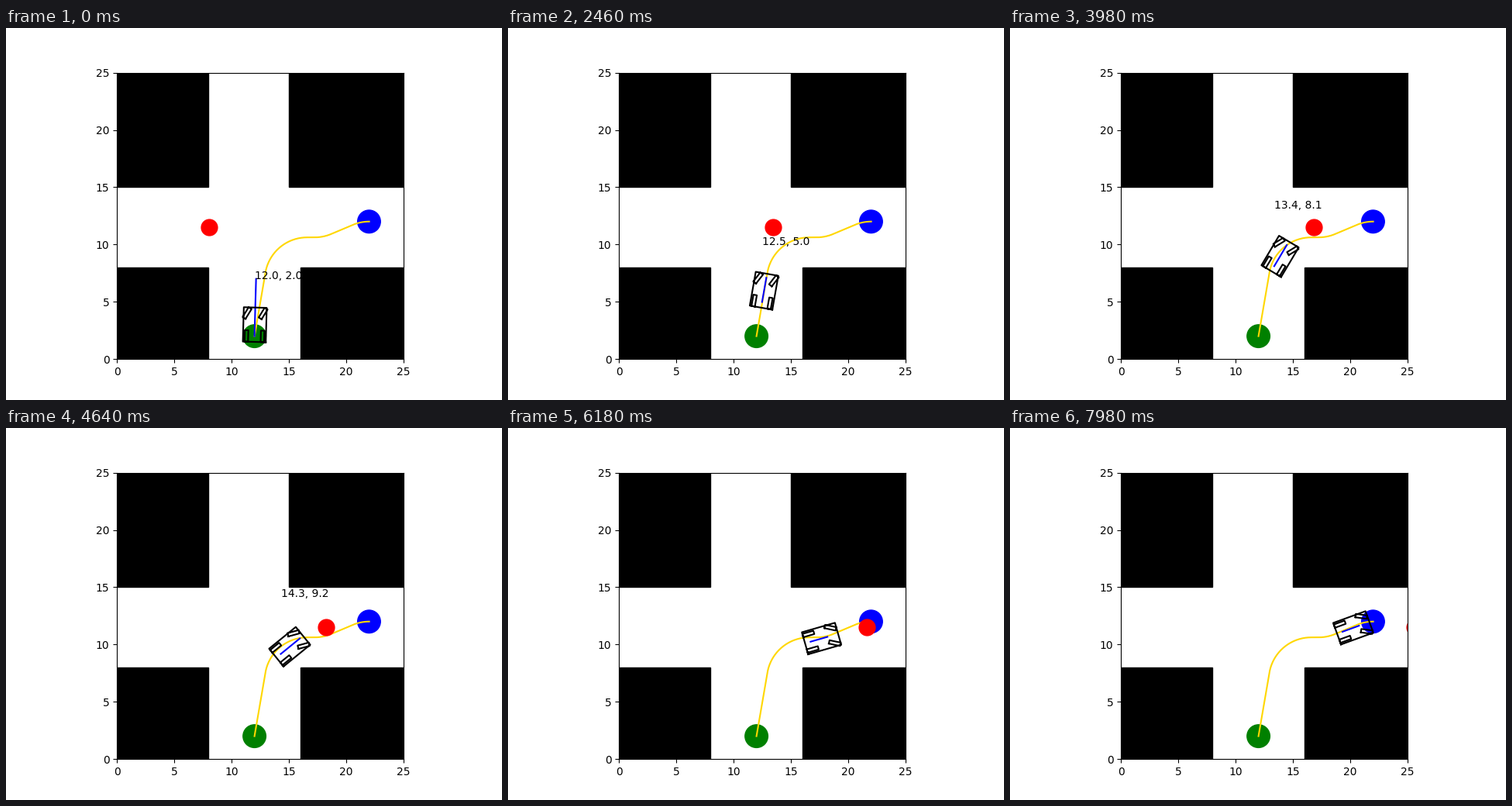
Write a matplotlib script that moves like this. It is 640 px wide and 480 px high and loops after 8000 ms.

```python
import numpy as np
import matplotlib.pyplot as plt
from matplotlib.animation import FuncAnimation
from matplotlib.patches import Circle, Rectangle

FRAMES, DT = 400, 0.02
START, GOAL = np.array([12, 2]), (22, 12)
WHEELBASE, TREAD, BACK = 2.0, 0.7, 0.5
BODY_LEN, BODY_WID = 3.0, 2.0
WHEEL_LEN, WHEEL_WID = 1.0, 0.3
LOCK, CHATTER = 30, 28          # steering limits, degrees
ACCEL, CRUISE, SLOW = 1.02, 2.15, 1.53
TARGET_SPEED = 5
RADIUS = 3.7                    # of every bend in the route


def ease(t, start, end):
    u = np.clip((t - start) / (end - start), 0, 1)
    return u * u * (3 - 2 * u)


def integrate(rate, dx):
    """Running trapezoid sum, starting at zero."""
    return np.r_[0, np.cumsum((rate[1:] + rate[:-1]) / 2 * dx)]


def straight(length):
    return length, 0


def bend(degrees):
    return RADIUS * np.radians(abs(degrees)), degrees


def trace(start, heading, legs, n=60):
    """Points along a chain of straights and bends."""
    points = [np.array([start])]
    for length, change in legs:
        yaw = np.radians(heading + change * np.linspace(0, 1, n))
        ds = length / (n - 1)
        leg = np.column_stack([integrate(np.cos(yaw), ds), integrate(np.sin(yaw), ds)])
        points.append(points[-1][-1] + leg[1:])
        heading += change
    return np.vstack(points)


def box(x0, x1, y0, y1):
    return np.array([[x0, y0], [x1, y0], [x1, y1], [x0, y1], [x0, y0]])


def turn(points, angle):
    c, s = np.cos(angle), np.sin(angle)
    return points @ np.array([[c, s], [-s, c]])


route = trace(START, 80.25, [straight(5.63), bend(-80.25), straight(0.65),
                             bend(23), straight(2.03), bend(-23)])

# speed up, cruise, slow down after the corner
t = np.arange(FRAMES) * DT
speed = np.minimum(ACCEL * t, CRUISE - (CRUISE - SLOW) * ease(t, 4.6, 5.7))
driven = integrate(speed, DT)

# full lock onto the first straight, then the corner and a slight left
lock_rate = np.degrees(np.tan(np.radians(LOCK)) / WHEELBASE)
heading = np.maximum(80, 88.4 - lock_rate * driven)
heading += -64 * ease(t, 2.8, 5.9) + 4 * ease(t, 6.2, 7.6)
yaw = np.radians(heading)
direction = np.column_stack([np.cos(yaw), np.sin(yaw)])
position = START + np.column_stack(
    [integrate(speed * direction[:, j], DT) for j in (0, 1)])

# steering flips between two values that average to the needed angle
need = np.degrees(np.arctan(WHEELBASE * np.gradient(yaw, driven)))
flip = np.arange(FRAMES) % 2 == 1
steer = np.radians(np.where(flip, -CHATTER, np.clip(2 * need + CHATTER, -LOCK, LOCK)))

reach = np.where(ACCEL * t < CRUISE, TARGET_SPEED, speed)
tip = position + reach[:, None] * direction

BODY = box(-BACK, BODY_LEN - BACK, -BODY_WID / 2, BODY_WID / 2)
WHEEL = box(-WHEEL_LEN / 2, WHEEL_LEN / 2, -WHEEL_WID / 2, WHEEL_WID / 2)
GAP = np.full((1, 2), np.nan)


def car_outline(k):
    parts = [BODY]
    for side in (-TREAD, TREAD):
        parts += [GAP, WHEEL + [0, side],
                  GAP, turn(WHEEL, steer[k]) + [WHEELBASE, side]]
    return turn(np.vstack(parts), yaw[k]) + position[k]


fig, ax = plt.subplots(figsize=(6.4, 4.8), dpi=100)
ax.set_aspect("equal")
ax.set(xlim=(0, 25), ylim=(0, 25),
       xticks=range(0, 26, 5), yticks=range(0, 26, 5))

for x, y, w, h in [(0, 0, 8, 8), (16, 0, 9, 8), (0, 15, 8, 10), (15, 15, 10, 10)]:
    ax.add_patch(Rectangle((x, y), w, h, color="black"))
ax.add_patch(Circle(START, 1, color="green"))
ax.add_patch(Circle(GOAL, 1, color="blue"))
ax.plot(*route.T, color="gold")

walker, = ax.plot([], [], "o", color="red", markersize=15)
pointer, = ax.plot([], [], color="blue")
car, = ax.plot([], [], color="black")
label = ax.text(0, 0, "")


def update(k):
    x, y = position[k]
    walker.set_data([8 + 0.044 * (k + 1)], [11.5])
    pointer.set_data(*np.transpose([position[k], tip[k]]))
    car.set_data(*car_outline(k).T)
    label.set_position((x, y + 5))
    label.set_text(f"{x:.1f}, {y:.1f}")
    return walker, pointer, car, label


anim = FuncAnimation(fig, update, frames=FRAMES, interval=1000 * DT,
                     repeat=True, repeat_delay=0)
plt.show()
```
